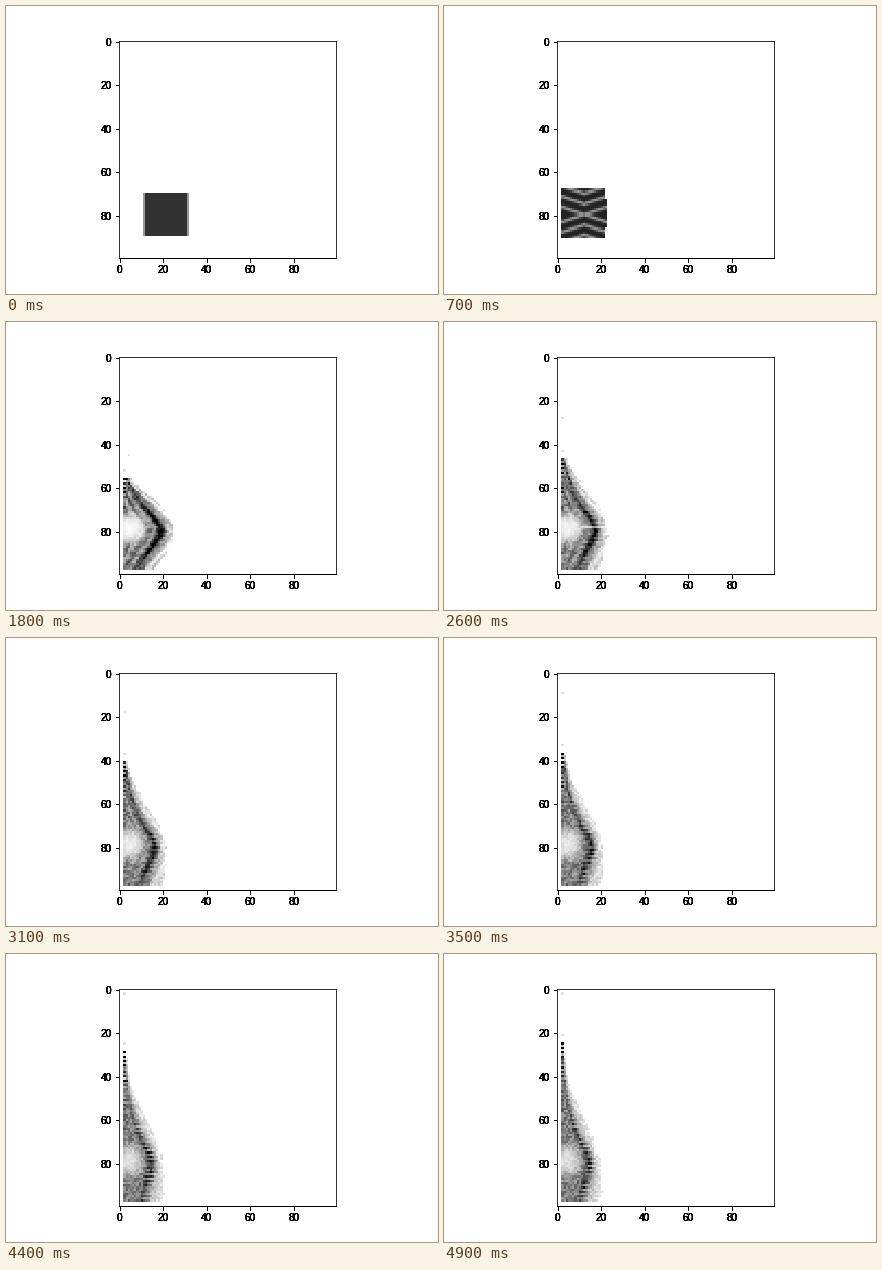
These frames come from a looping animation (432x288 px, 5000 ms). A matplotlib script:

```python
import numpy as np
import matplotlib.pyplot as plt
from matplotlib.animation import FuncAnimation

SIZE, FRAMES = 100, 50
WALL, FLOOR = 2, 97
MID = 79.5
IMPACT = 7  # step at which the block reaches the wall

# Outline of the spreading fluid: top row, and right edge from top to bottom.
STEPS = [IMPACT, 12, 18, 26, 31, 40, 49]
TOPS = [68, 62, 55.6, 46.6, 40.6, 32, 24.8]
LEVELS = [0, 0.25, 0.5, 0.62, 0.75, 1]
EDGES = np.array([
    [22, 22.6, 22.6, 22.6, 22.6, 22],
    [6, 19.5, 25, 25.4, 24, 16],
    [4, 17.5, 24.6, 25.2, 23.5, 16.5],
    [3.6, 12, 21, 23, 23, 19.5],
    [3.3, 9, 17.5, 21, 21.8, 20.3],
    [3, 6.5, 15, 18.5, 20.6, 20.3],
    [3, 4.8, 13, 17, 20, 20.2],
])

rows, cols = np.mgrid[:SIZE, :SIZE].astype(float)
grain = np.random.default_rng(4).uniform(-1, 1, (80, 32))


def bump(value, width):
    return np.exp(-(value / width) ** 2)


def folded(step):
    """Dark block crossed by light, vertically mirrored creases."""
    v = np.abs(rows - MID)
    crease = np.cos(0.66 * v - 0.22 * np.abs(cols - 12)) ** 6
    amount = np.clip((step - 1) / 6, 0, 1)
    return 0.8 + amount * (0.06 - 0.45 * crease)


def block(step):
    left, right = 11.5 - 1.36 * step, 31.5 - 1.3 * step
    across = np.clip(cols + 1 - left, 0, 1) * np.clip(right - cols, 0, 1)
    down = (rows >= 70) & (rows < 90)
    return across * down * folded(step)


def right_edge(step, u):
    """Outline at relative height u, averaged so that it has no corners."""
    profile = [np.interp(step, STEPS, e) for e in EDGES.T]
    shifts = np.linspace(-0.08, 0.08, 7)
    return np.mean([np.interp(u + s, LEVELS, profile) for s in shifts], axis=0)


def plume(step):
    top = np.interp(step, STEPS, TOPS)
    bottom = np.interp(step, [IMPACT, 12], [90, FLOOR])
    age = np.clip((step - 12) / 30, 0, 1)
    u = (rows - top) / (bottom - top)
    x = (cols + 0.5 - WALL) / (right_edge(step, u) - WALL)
    noise = grain[np.clip(u * 70, 0, 79).astype(int),
                  np.clip(x * 20, 0, 31).astype(int)]

    # The dark ridge bulges outwards level with the middle of the block.
    bulge = bump(rows - MID, 12)
    ridge = 0.48 + (0.3 - 0.04 * age) * bulge
    halo = 0.06 + 0.3 * np.clip((1 - x) / (1 - ridge), 0, 1)
    body = np.where(x < ridge, 0.5, halo)
    body += 0.16 * noise * np.where(x < ridge, 1, 0.6)

    # Layered rings at first, breaking up into dots along the ridge.
    rings = np.cos(24 * x + 0.6 * np.abs(rows - MID))
    body += 0.16 * (1 - age) * rings
    dots = 0.5 + 0.5 * np.cos(2 * np.pi * (rows - top) / 2.2)
    strength = (0.3 + 0.25 * bulge) * (1 - age * (1 - dots))
    body += strength * bump(x - ridge, 0.12)
    body += 0.5 * bump(u, 0.3) * (cols == WALL) * (2 * dots - 0.7)

    hollow = np.exp(-(((cols - 4.5) / (8 - 2 * age)) ** 2
                      + ((rows - MID + 1) / 7) ** 2) ** 1.6)
    body *= 1 - (1 - 0.25 * age) * hollow
    slit = (rows == 78) & (x > 0.45)
    body *= 1 - 0.75 * slit * bump(step - 24, 5)

    blend = np.clip((step - IMPACT) / 6, 0, 1)
    field = (1 - blend) * folded(IMPACT) + blend * np.clip(body, 0, 1)
    field *= ((x <= 1 + 0.03 * blend * noise) & (cols >= WALL)
              & (rows >= top) & (rows <= bottom))

    # Faint specks running ahead along the wall.
    if step >= 10:
        lead = round(max(2, 45 - 2.1 * (step - 18)))
        field[lead, 4 if step < 22 else WALL] += 0.12
        field[int(top) - 3, WALL] += 0.12
    return field


def density(step):
    field = block(step) if step < IMPACT else plume(step)
    return np.clip(field, 0, 1)


plt.rcParams.update({"font.family": "Liberation Sans", "font.size": 10})
fig = plt.figure(figsize=(6, 4), dpi=72)
fig.subplots_adjust(left=0.125, right=0.9, bottom=0.125, top=0.88)

# Stacked plots make the labels and ticks fully dark.
for _ in range(6):
    ax = fig.add_subplot()
    image = ax.imshow(density(0), cmap="binary", vmin=0, vmax=1,
                      interpolation="nearest")
    ax.set(xticks=range(0, SIZE, 20), yticks=range(0, SIZE, 20),
           facecolor="none")
layers = [ax.images[0] for ax in fig.axes]


def update(step):
    field = density(step)
    for layer in layers:
        layer.set_data(field)
    return layers


anim = FuncAnimation(fig, update, frames=FRAMES, interval=100,
                     repeat=True, repeat_delay=0, blit=False)
plt.show()
```
